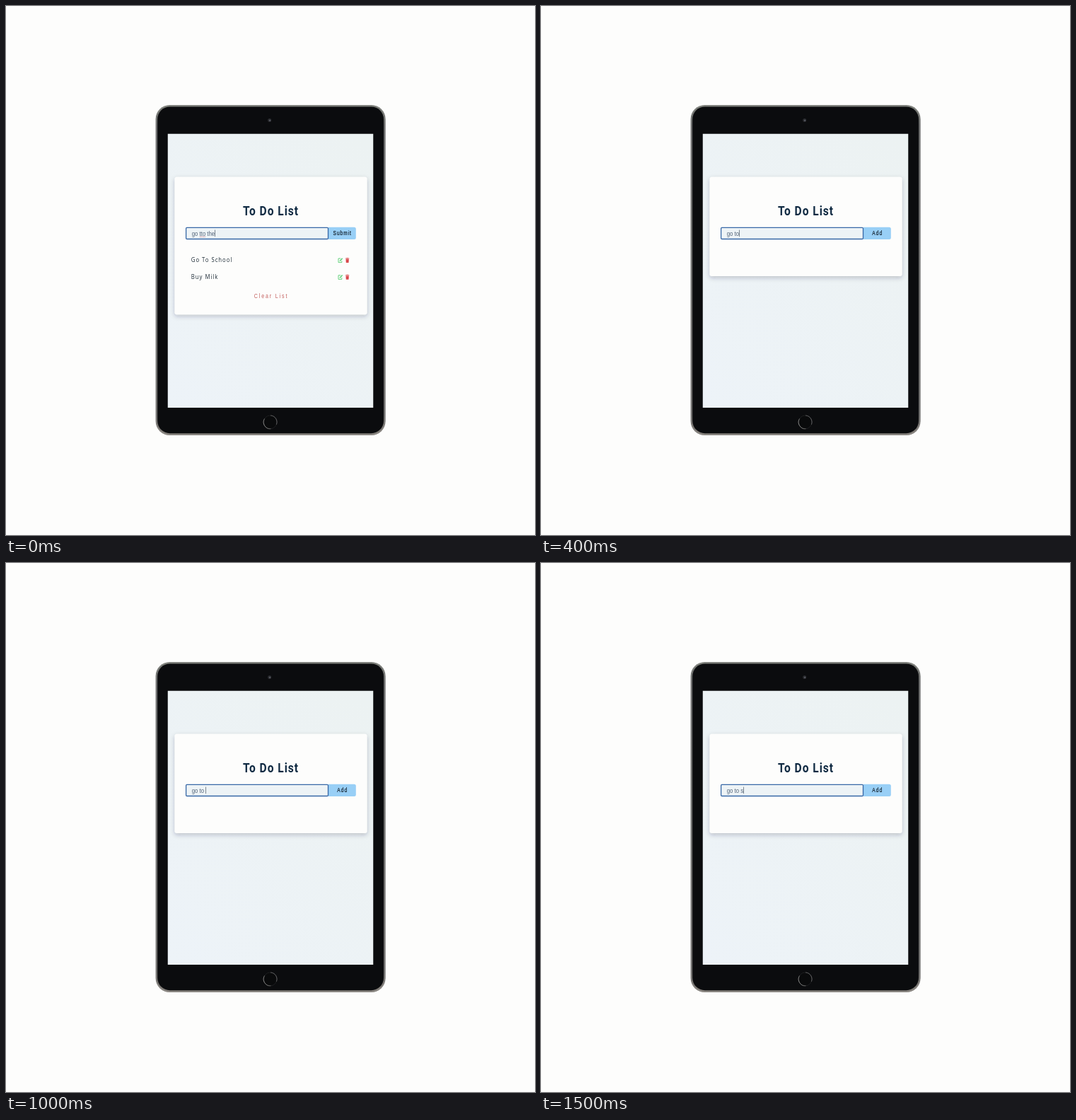
These frames come from a looping animation (748x748 px, 1600 ms). An HTML page:

```html
<!DOCTYPE html>
<html lang="en">
<head>
<meta charset="utf-8">
<title>To Do List</title>
<style>
  html, body { margin: 0; width: 100%; height: 100%; overflow: hidden; background: #fdfdfc; }
  svg { display: block; width: 100vw; height: 100vh; }
  text { white-space: pre; }
  .title { font: 700 32px Roboto, sans-serif; letter-spacing: 2px; fill: #102a42; }
  .item { font: 400 16px "Open Sans", sans-serif; letter-spacing: 2px; fill: #1d2b36; }
  .typed { font: 400 16px "Liberation Sans", Arial, sans-serif; fill: #54657a; }
  .button { font: 400 13.6px "Liberation Sans", Arial, sans-serif; letter-spacing: 2px; fill: #0d1822; stroke: #0d1822; stroke-width: .3px; }
  .clear { font: 400 14.5px "Liberation Sans", Arial, sans-serif; letter-spacing: 3.85px; fill: #c4615f; }
</style>
</head>
<body>
<svg viewBox="0 0 748 748" xmlns="http://www.w3.org/2000/svg">
  <defs>
    <linearGradient id="rim" x1="0" y1="0" x2="0" y2="1">
      <stop offset="0" stop-color="#777a73"/>
      <stop offset=".06" stop-color="#5c5d5e"/>
      <stop offset=".94" stop-color="#626160"/>
      <stop offset="1" stop-color="#85807a"/>
    </linearGradient>
    <linearGradient id="page" x1="1" y1="0" x2="0" y2="1">
      <stop offset="0" stop-color="#ecf2f2"/>
      <stop offset="1" stop-color="#edf3f8"/>
    </linearGradient>
    <linearGradient id="ring" x1="0" y1=".7" x2="1" y2=".3">
      <stop offset="0" stop-color="#8d8d8b"/>
      <stop offset=".5" stop-color="#4a4a4a"/>
      <stop offset="1" stop-color="#68686a"/>
    </linearGradient>
    <filter id="shadow" x="-10%" y="-15%" width="120%" height="135%">
      <feDropShadow dx="0" dy="2.5" stdDeviation="3.4" flood-color="#1c2a3c" flood-opacity=".24"/>
    </filter>
    <clipPath id="screen"><rect x="228.5" y="180.5" width="291" height="387.5"/></clipPath>
    <g id="icons">
      <g fill="none" stroke="#5fd07a" stroke-width=".95">
        <path d="M473.2 -2.6H470V3H474.8V.8"/>
        <path d="M472 1.1L475.6 -2.9" stroke-width="1.5"/>
      </g>
      <g fill="#d9484c">
        <rect x="480.1" y="-3.1" width="5.1" height="1"/>
        <rect x="481.7" y="-3.6" width="1.9" height=".8"/>
        <path d="M480.5 -1.7H484.8L484.5 3.3H480.8Z"/>
      </g>
    </g>
  </defs>

  <rect width="748" height="748" fill="#fdfdfc"/>

  <rect x="211.6" y="140" width="325" height="467" rx="20" fill="url(#rim)"/>
  <rect x="212.5" y="141" width="323.2" height="465" rx="19" fill="none" stroke="#9a9b98" stroke-width=".5"/>
  <rect x="214.3" y="142.4" width="319.6" height="461.8" rx="17.5" fill="#0b0c0e"/>
  <circle cx="372.7" cy="161.6" r="2.5" fill="#2c2d31"/>
  <circle cx="373.1" cy="161.9" r="1.1" fill="#585b64"/>
  <circle cx="373.6" cy="588.4" r="9.4" fill="#090a0b" stroke="#232425" stroke-width=".8"/>
  <path d="M365.6 583.5A9.4 9.4 0 0 0 374.5 597.8M374 579A9.4 9.4 0 0 1 382.4 591.8" fill="none" stroke="url(#ring)" stroke-width="1"/>

  <g clip-path="url(#screen)">
    <rect x="228.5" y="180.5" width="291" height="387.5" fill="url(#page)"/>
    <rect id="card" x="238.5" y="241.7" width="272" rx="3" fill="#fdfdfc" filter="url(#shadow)"/>
    <path d="M456 312.8H492.3Q494.8 312.8 494.8 315.3V327.5Q494.8 330 492.3 330H456Z" fill="#98cff6"/>
    <rect x="254.6" y="313.3" width="200.9" height="16.2" rx="1.3" fill="#edf3f6" stroke="#3767a6" stroke-width="1.3"/>
    <g id="labels"></g>
    <g id="list">
      <use href="#icons" y="359.6"/>
      <use href="#icons" y="383.4"/>
      <path d="M274 326.3H282.4" stroke="#c46a78" stroke-width=".9" stroke-dasharray="1 .7"/>
    </g>
    <rect id="caret" y="316.6" width=".7" height="9.6" fill="#4b5866"/>
  </g>
</svg>
<script>
const LOOP = 1600;
const SX = 0.486, SY = 0.6;   // the page is shown narrower than it is tall
const INPUT_X = 262.8;
const $ = id => document.getElementById(id);

function label(parent, cls, str, x, y, anchor = 'start') {
  const el = document.createElementNS('http://www.w3.org/2000/svg', 'text');
  el.setAttribute('class', cls);
  el.setAttribute('text-anchor', anchor);
  el.setAttribute('transform', `translate(${x} ${y}) scale(${SX} ${SY})`);
  el.textContent = str;
  parent.appendChild(el);
  return el;
}

const labels = $('labels'), list = $('list'), card = $('card'), caret = $('caret');
label(labels, 'title', 'To Do List', 374.5, 296, 'middle');
const typed = label(labels, 'typed', '', INPUT_X, 324.6);
const button = label(labels, 'button', '', 475.7, 324.4, 'middle');
label(list, 'item', 'Go To School', 261.8, 362.3);
label(list, 'item', 'Buy Milk', 261.8, 386.1);
label(list, 'clear', 'Clear List', 375, 413.4, 'middle');

const steps = [
  { at: 0, text: 'go tto the', editing: true, caret: true },
  { at: 300, text: 'go to', caret: true },
  { at: 500, text: 'go to ', caret: true },
  { at: 1100, text: 'go to ' },
  { at: 1500, text: 'go to s', caret: true }
];

let shown;
function render(ms) {
  const t = ms % LOOP;
  const step = steps.filter(s => s.at <= t).pop();
  if (step === shown) return;
  shown = step;
  typed.textContent = step.text;
  button.textContent = step.editing ? 'Submit' : 'Add';
  list.style.display = step.editing ? '' : 'none';
  card.setAttribute('height', step.editing ? 194.5 : 140.3);
  caret.style.display = step.caret ? '' : 'none';
  caret.setAttribute('x', INPUT_X + typed.getComputedTextLength() * SX);
}

const start = performance.now();
function tick() {
  render(performance.now() - start);
  requestAnimationFrame(tick);
}
tick();
</script>
</body>
</html>
```
